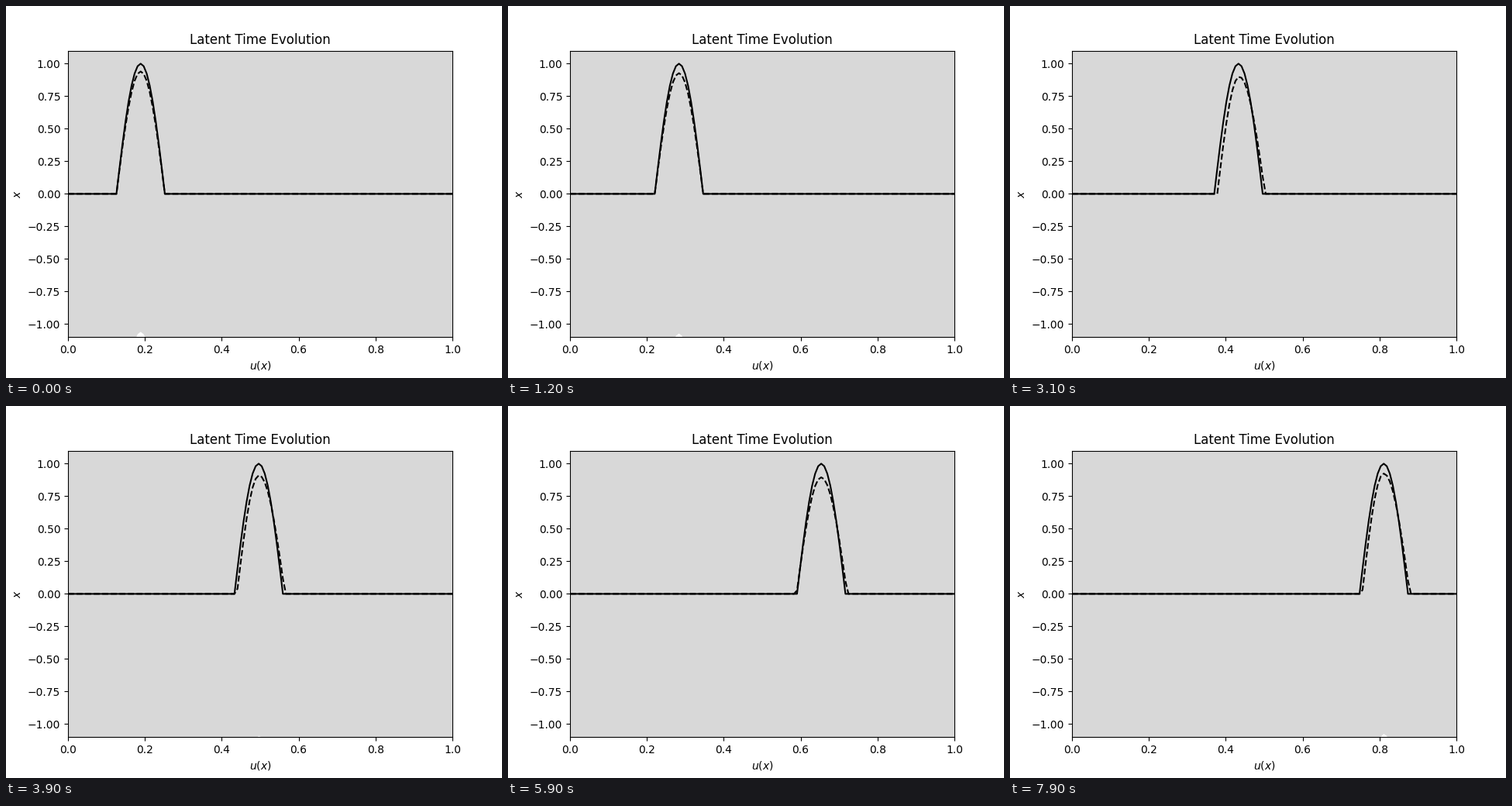
Animation, 640 px wide and 480 px high, one loop 8 s. Source, as a matplotlib script:

```python
import numpy as np
import matplotlib.pyplot as plt
from matplotlib.animation import FuncAnimation

N = 128            # grid points
FRAMES = 80
INTERVAL = 100     # ms; the pulse moves one grid point per frame
START = 24         # grid index of the first peak
HALF = 8           # half width of the exact pulse, in grid points
BAND = 2.0         # half height of the shaded band

# Predicted pulse over time: height, peak shift, left and right half width
KEYS = np.array([0, 12, 31, 47, 59, 71, 79])
HEIGHT = [0.94, 0.927, 0.90, 0.92, 0.895, 0.922, 0.924]
SHIFT = [0, 0, 0.25, 0, 0, 0, 0]
LEFT = [8, 8, 7, 7.4, 8.15, 7, 7.15]
RIGHT = [8, 8, 8.8, 8.6, 8.6, 8.7, 8.6]

x = np.linspace(0, 1, N)
idx = np.arange(N)


def pulse(center, height, shift, left, right):
    """Cosine arch with separate widths on either side of its peak."""
    k = idx - center - shift
    width = np.where(k < 0, left + shift, right - shift)
    phase = np.clip(k / width, -1, 1)
    return height * np.cos(np.pi / 2 * phase)


def curves(i):
    center = START + i
    exact = pulse(center, 1, 0, HALF, HALF)
    params = [np.interp(i, KEYS, p) for p in (HEIGHT, SHIFT, LEFT, RIGHT)]
    return exact, pulse(center, *params)


def band_path(mean):
    lower = np.column_stack([x, mean - BAND])
    upper = np.column_stack([x, mean + BAND])
    return np.vstack([lower, upper[::-1]])


fig, ax = plt.subplots(figsize=(6.4, 4.8), dpi=100)
ax.set(xlim=(0, 1), ylim=(-1.1, 1.1), xlabel="$u(x)$", ylabel="$x$",
       title="Latent Time Evolution")

exact, mean = curves(0)
solid, = ax.plot(x, exact, "k-")
dashed, = ax.plot(x, mean, "k--")
band, = ax.fill(*band_path(mean).T, facecolor="gray", alpha=0.3, linewidth=0)


def update(i):
    exact, mean = curves(i)
    solid.set_ydata(exact)
    dashed.set_ydata(mean)
    band.set_xy(band_path(mean))
    return band, solid, dashed


anim = FuncAnimation(fig, update, frames=FRAMES, interval=INTERVAL,
                     repeat=True, repeat_delay=0)
plt.show()
```
